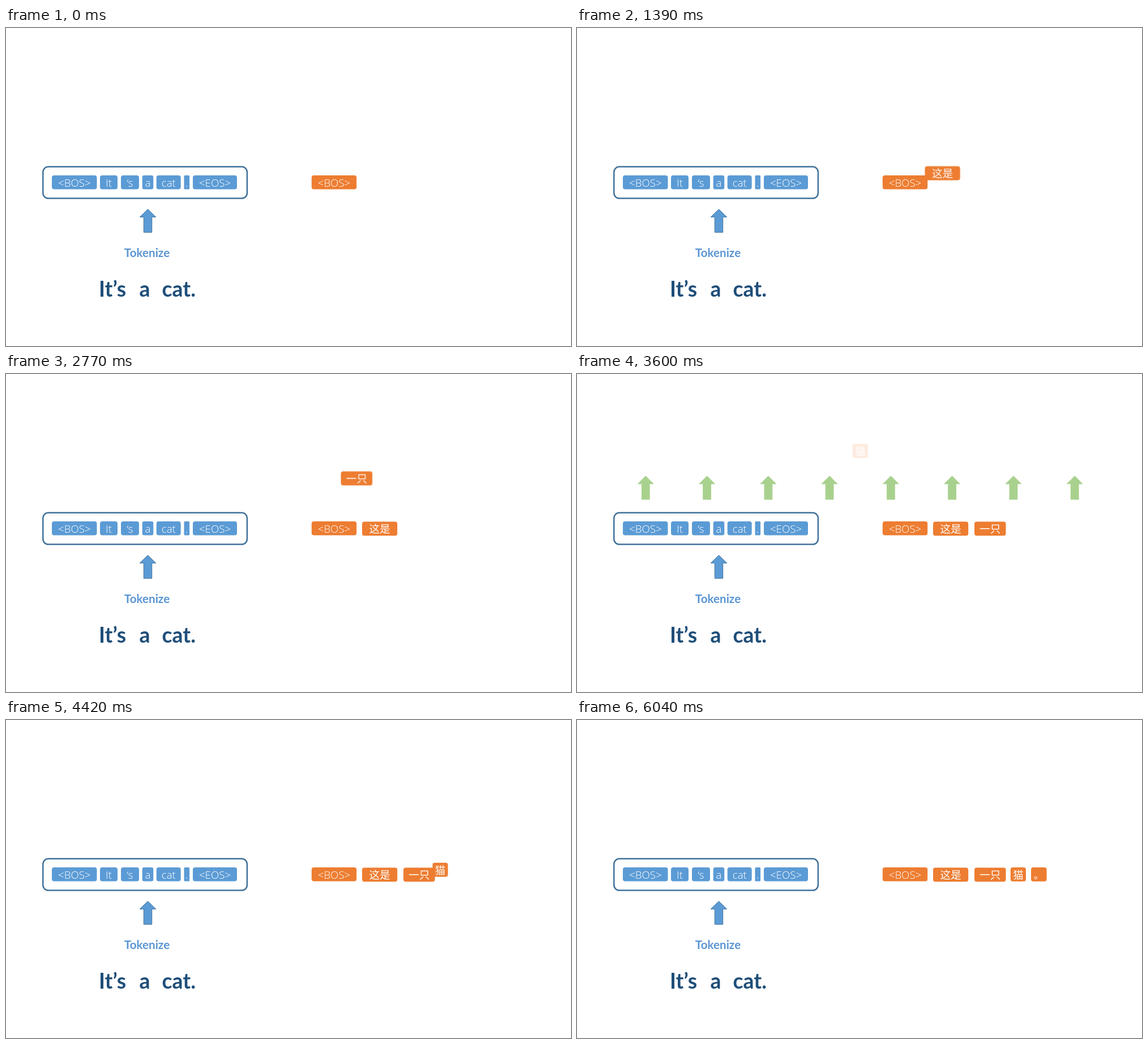
An HTML page that plays this animation: 998 px wide and 561 px high, repeating every 6.07 s.

```html
<!DOCTYPE html>
<html lang="zh-CN">
<head>
<meta charset="utf-8">
<title>Token by token translation</title>
<style>
  html, body { margin: 0; width: 100%; height: 100%; overflow: hidden; background: #fff; }
  svg { display: block; position: absolute; left: 0; top: 0; }

  .token text {
    font: 300 18.7px "Open Sans", "Noto Sans CJK SC", "Noto Sans CJK", sans-serif;
    fill: #fff;
    text-anchor: middle;
  }
  .source { fill: #5b9bd5; }
  .output { fill: #ed7d31; }
  .label { font: 700 20.6px Lato, sans-serif; fill: #5b95d3; text-anchor: middle; }
  .sentence { font: 700 37.4px Lato, sans-serif; fill: #1f4e79; }
  .outline { stroke: #41719c; }

  /* The mask slides up: clear, feather, solid, feather, clear. */
  .arrows {
    position: absolute; left: 0; top: 179px; width: 998px; height: 44px;
    -webkit-mask-image: linear-gradient(transparent 44px, #000 50px, #000 94px, transparent 100px);
    -webkit-mask-size: 100% 144px;
    -webkit-mask-repeat: no-repeat;
    animation: wipe 1517.5ms linear infinite;
  }
  @keyframes wipe {
    0%, 0.7% { -webkit-mask-position: 0 0; }
    32.9%, 37.2% { -webkit-mask-position: 0 -50px; }
    65.9%, 100% { -webkit-mask-position: 0 -100px; }
  }

  /* Each word fades in while rising, then flies to its slot. */
  .word { animation: 6070ms linear infinite; }
  .w1 { --dx: -160px; animation-name: word1; }
  .w2 { --dx: -229px; animation-name: word2; }
  .w3 { --dx: -279px; animation-name: word3; }
  .w4 { --dx: -316px; animation-name: word4; }
  @keyframes word1 {
    0%, 8.24% { opacity: 0; transform: translate(var(--dx), -128px); }
    16.44% { opacity: 1; transform: translate(var(--dx), -184px); animation-timing-function: cubic-bezier(.455, .03, .535, .97); }
    24.68%, 100% { opacity: 1; transform: translate(0, 0); }
  }
  @keyframes word2 {
    0%, 33.31% { opacity: 0; transform: translate(var(--dx), -128px); }
    41.48% { opacity: 1; transform: translate(var(--dx), -184px); animation-timing-function: cubic-bezier(.455, .03, .535, .97); }
    49.72%, 100% { opacity: 1; transform: translate(0, 0); }
  }
  @keyframes word3 {
    0%, 58.12% { opacity: 0; transform: translate(var(--dx), -128px); }
    65.82% { opacity: 1; transform: translate(var(--dx), -184px); animation-timing-function: cubic-bezier(.455, .03, .535, .97); }
    74.05%, 100% { opacity: 1; transform: translate(0, 0); }
  }
  @keyframes word4 {
    0%, 83.03% { opacity: 0; transform: translate(var(--dx), -128px); }
    91.19% { opacity: 1; transform: translate(var(--dx), -184px); animation-timing-function: cubic-bezier(.455, .03, .535, .97); }
    99.42%, 100% { opacity: 1; transform: translate(0, 0); }
  }
</style>
</head>
<body>
<div class="arrows">
  <svg width="998" height="44" fill="#a9d18e">
    <defs>
      <path id="up" d="M0 .5 L14.7 15.3 H7.4 V42.8 H-7.4 V15.3 H-14.7 Z"/>
    </defs>
    <use href="#up" x="121.3"/>
    <use href="#up" x="229.6"/>
    <use href="#up" x="337.9"/>
    <use href="#up" x="446.1"/>
    <use href="#up" x="554.4"/>
    <use href="#up" x="662.6"/>
    <use href="#up" x="770.9"/>
    <use href="#up" x="879.2"/>
  </svg>
</div>

<svg width="998" height="561">
  <rect class="outline" x="65.3" y="244.8" width="360.6" height="55.8" rx="9.5" fill="none" stroke-width="2.5"/>

  <g class="token source">
    <rect x="81" y="260" width="79.5" height="24.6" rx="4"/><text x="120.8" y="279.6">&lt;BOS&gt;</text>
    <rect x="166" y="260" width="31" height="24.6" rx="4"/><text x="181.5" y="279.6">It</text>
    <rect x="203" y="260" width="32" height="24.6" rx="4"/><text x="219" y="279.6">‘s</text>
    <rect x="240.7" y="260" width="19.6" height="24.6" rx="3.3"/><text x="250.5" y="279.6">a</text>
    <rect x="265.7" y="260" width="43" height="24.6" rx="4"/><text x="287.3" y="279.6">cat</text>
    <rect x="314.5" y="260" width="9.6" height="24.6" rx="1.5"/><text x="319.3" y="279.6">.</text>
    <rect x="330" y="260" width="78" height="24.6" rx="4"/><text x="369" y="279.6">&lt;EOS&gt;</text>
  </g>

  <path class="outline" fill="#5b9bd5" d="M250.5 319.8 L264.8 333.6 H257.7 V360.6 H243.3 V333.6 H236.2 Z"/>
  <text class="label" x="249" y="403.8">Tokenize</text>
  <g class="sentence">
    <text x="164" y="473.8">It’s</text>
    <text x="235.5" y="473.8">a</text>
    <text x="275.5" y="473.8">cat.</text>
  </g>

  <g class="token output">
    <rect x="539.8" y="260" width="79.4" height="24.6" rx="4"/><text x="579.5" y="279.6">&lt;BOS&gt;</text>
    <g class="word w1"><rect x="629" y="260.5" width="62.2" height="24.8" rx="4"/><text x="660.1" y="280.4">这是</text></g>
    <g class="word w2"><rect x="702" y="260.5" width="55.5" height="24.8" rx="4"/><text x="729.7" y="280.4">一只</text></g>
    <g class="word w3"><rect x="765.8" y="260" width="27.2" height="24.8" rx="4"/><text x="779.4" y="279.8">猫</text></g>
    <g class="word w4"><rect x="802" y="260" width="27.6" height="24.8" rx="4"/><text x="815.8" y="279.8">。</text></g>
  </g>
</svg>
</body>
</html>
```
